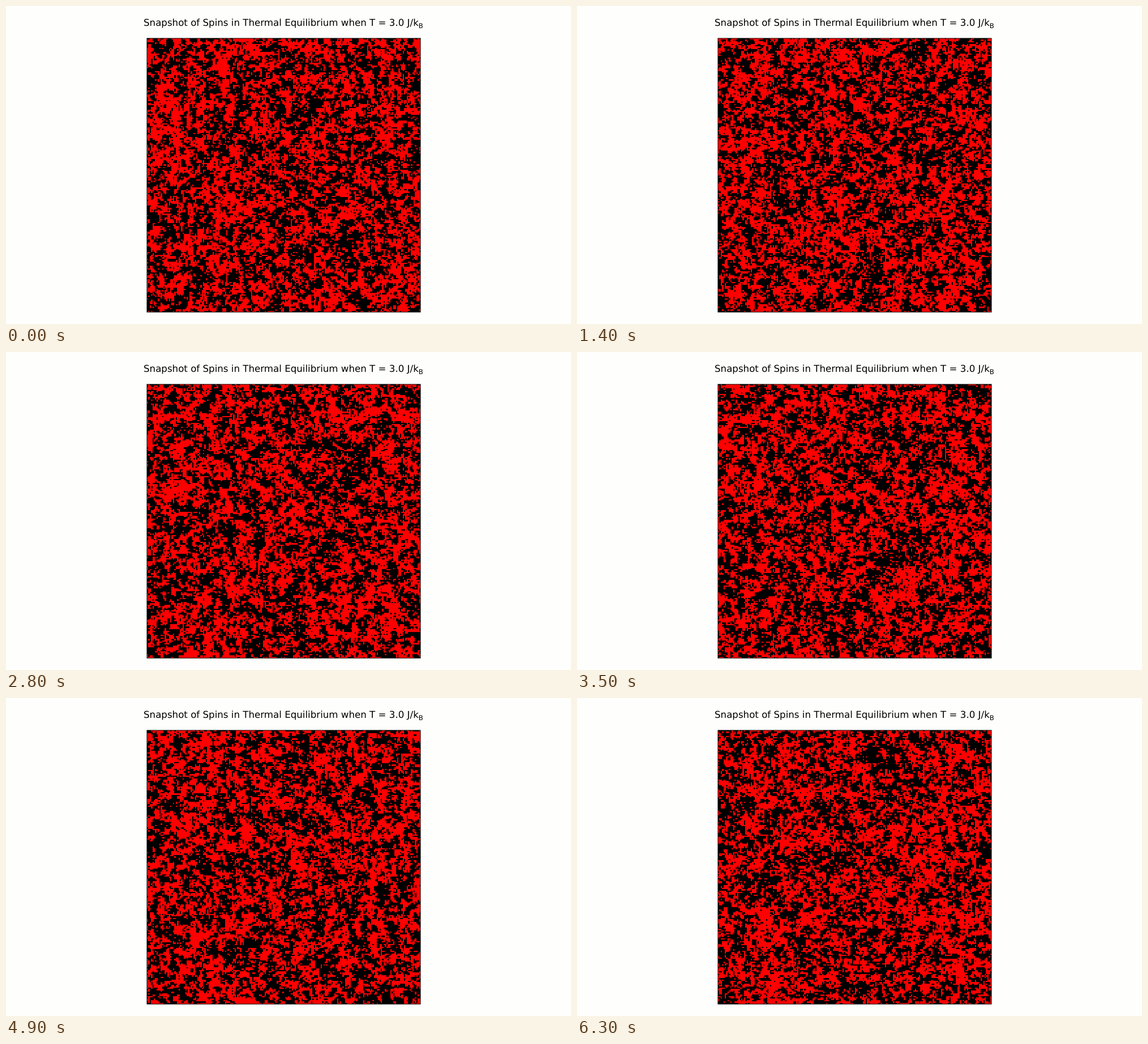
Recreate the animation shown at these times as an HTML page with a canvas. Size 998 by 561 pixels, loop 7000 ms.

```html
<!DOCTYPE html>
<html lang="en">
<head>
<meta charset="utf-8">
<title>Spins in Thermal Equilibrium</title>
<style>
  html, body { margin: 0; width: 100%; height: 100%; overflow: hidden; background: #fefefc; }
  svg, canvas { position: absolute; display: block; }
  svg { left: 0; top: 0; }
  canvas { left: 249px; top: 57px; }
  text { font-family: "DejaVu Sans", sans-serif; font-size: 16.667px; text-rendering: geometricPrecision; }
  .sub { font-size: 11.667px; }
</style>
</head>
<body>
<canvas id="lattice" width="483" height="483"></canvas>
<svg width="998" height="561" viewBox="0 0 998 561">
  <text x="243" y="35">Snapshot of Spins in Thermal Equilibrium when T = 3.0 J/k<tspan class="sub" dy="3.5">B</tspan></text>
  <rect x="249" y="57" width="483" height="483" fill="none" stroke="#000"/>
</svg>
<script>
const N = 200, SIZE = 483, TEMP = 3, STEPS = 10, HOLD = 700;
const WARMUP = 40, GAP = 5;
const RED = 0xff0000ff, BLACK = 0xff000000;

let seed = 20231;
function random() {
  seed = (seed + 0x6d2b79f5) | 0;
  let t = Math.imul(seed ^ (seed >>> 15), 1 | seed);
  t = (t + Math.imul(t ^ (t >>> 7), 61 | t)) ^ t;
  return ((t ^ (t >>> 14)) >>> 0) / 4294967296;
}

const spins = Int8Array.from({ length: N * N }, () => random() < 0.5 ? 1 : -1);

// Heat-bath chance of "up" for a neighbour sum of -4..4
const chance = Array.from({ length: 9 }, (_, i) => 1 / (1 + Math.exp(-2 * (i - 4) / TEMP)));

// One checkerboard sweep with periodic edges
function sweep() {
  for (let parity = 0; parity < 2; parity++) {
    for (let y = 0; y < N; y++) {
      const row = y * N, up = (y + N - 1) % N * N, down = (y + 1) % N * N;
      for (let x = (y + parity) % 2; x < N; x += 2) {
        const sum = spins[up + x] + spins[down + x] +
          spins[row + (x + 1) % N] + spins[row + (x + N - 1) % N];
        spins[row + x] = random() < chance[sum + 4] ? 1 : -1;
      }
    }
  }
}

function snapshot() {
  const tile = document.createElement("canvas");
  tile.width = tile.height = N;
  const tileCtx = tile.getContext("2d");
  const image = tileCtx.createImageData(N, N);
  const pixels = new Uint32Array(image.data.buffer);
  spins.forEach((s, i) => { pixels[i] = s > 0 ? RED : BLACK; });
  tileCtx.putImageData(image, 0, 0);
  return tile;
}

for (let i = 0; i < WARMUP; i++) sweep();
const snapshots = Array.from({ length: STEPS }, () => {
  for (let i = 0; i < GAP; i++) sweep();
  return snapshot();
});

const ctx = document.getElementById("lattice").getContext("2d");
ctx.imageSmoothingEnabled = false;

let shown = -1;
function draw(ms) {
  const step = Math.floor(ms / HOLD) % STEPS;
  if (step === shown) return;
  shown = step;
  ctx.drawImage(snapshots[step], 0, 0, SIZE, SIZE);
}

const start = performance.now();
function tick() {
  draw(performance.now() - start);
  requestAnimationFrame(tick);
}
tick();
</script>
</body>
</html>
```
